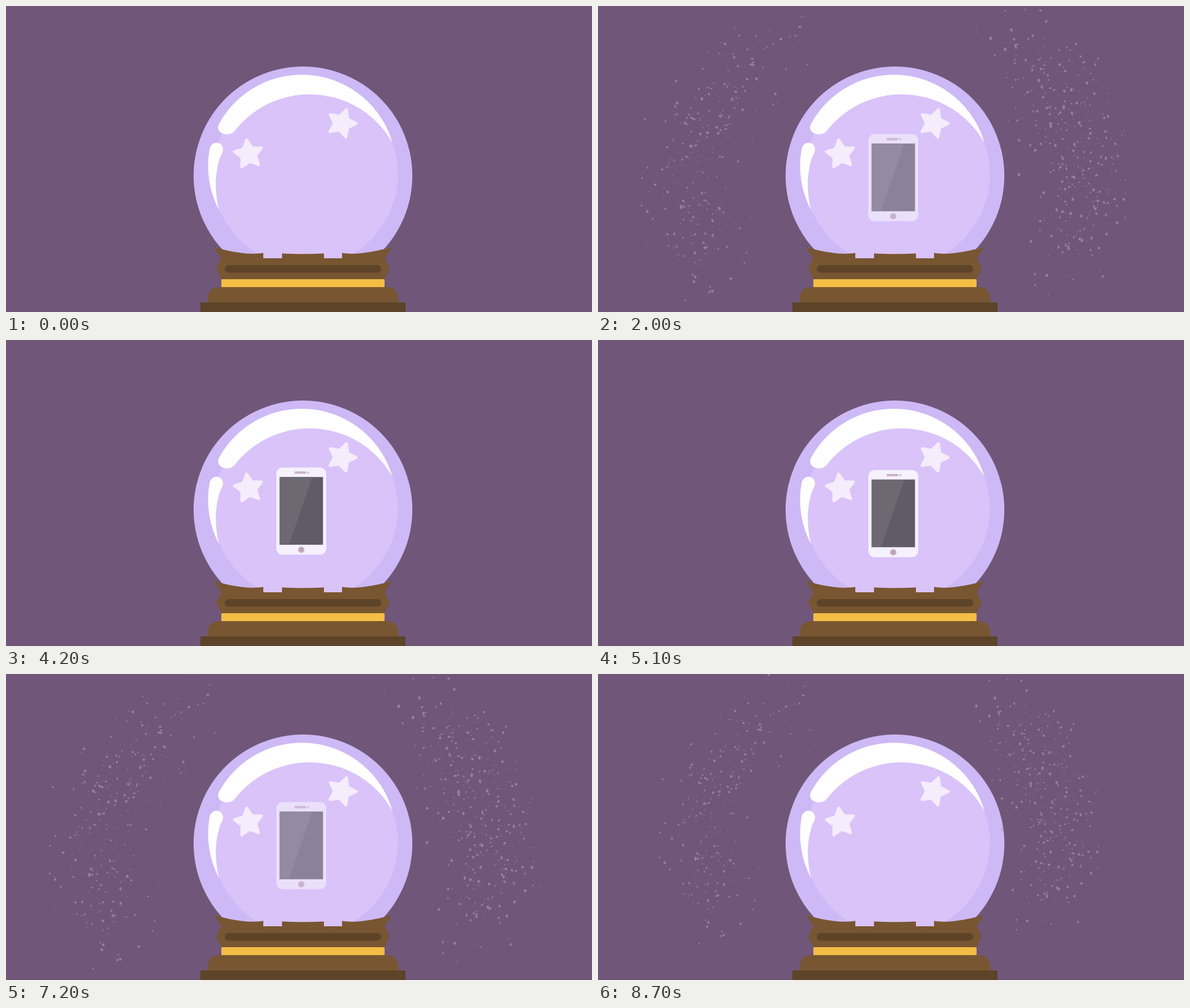
Animation of 1034 by 541 pixels, one loop 9200 ms. Source, as an HTML page:

```html
<!DOCTYPE html>
<html lang="en">
<head>
<meta charset="utf-8">
<title>Crystal ball</title>
<style>
  html, body { margin: 0; width: 100%; height: 100%; overflow: hidden; background: #705779; }
  svg { display: block; width: 100%; height: 100%; }
</style>
</head>
<body>
<svg viewBox="0 0 1034 541" preserveAspectRatio="none">
  <rect width="1034" height="541" fill="#705779"/>
  <rect y="540" width="1034" height="1" fill="#6a5273"/>

  <circle cx="524" cy="300" r="193" fill="#cdb9f5"/>
  <circle cx="528" cy="298" r="163.500" fill="#d9c3f9"/>
  <g fill="#fff">
    <path d="M682 242A166.500 166.500 0 0 0 376 208C370 220 380 227 390 227C398 227 402 223 405 219A167.500 167.500 0 0 1 682 242Z"/>
    <path d="M376 361A168 168 0 0 1 359 254C361 237.500 383 238 383 254C383 258 380 262 378 267C368 295 368 330 376 361Z"/>
  </g>
  <g id="stars" fill="#f5ecfc" stroke="#f5ecfc" stroke-width="5" stroke-linejoin="round"></g>

  <g id="phone">
    <rect x="477" width="88" height="154" rx="11" fill="#f5f1fd"/>
    <rect x="482.500" y="16.500" width="77" height="120" fill="#8d8598"/>
    <rect x="483" y="17" width="76" height="119" fill="#605b66"/>
    <path d="M483 17H540.500L499.500 136H483Z" fill="#6c6973"/>
    <rect x="509" y="6.700" width="21" height="4.200" rx="2.100" fill="#cbb3c8"/>
    <circle cx="533.300" cy="8.800" r="1.700" fill="#cbb3c8"/>
    <circle cx="521" cy="145.300" r="5.700" fill="#cbb3c6"/>
    <rect x="518.500" y="143.300" width="5" height="4" rx="1.300" fill="none" stroke="#937b98" stroke-width=".8"/>
  </g>

  <path d="M454 430H487V447H454ZM561 430H593V447H561Z" fill="#d9c3f9"/>
  <g fill="#785631">
    <path d="M367 426.500C396 434 426 441 454 436.500V446H487V437.500Q524 439.500 561 437.500V446H593V436.500C619 441 650 434 681 426.500L668 446L677 464L668 483H380L371 464L380 446Z"/>
    <path d="M356 524V516Q358 497 377 497H671Q690 497 692 516V524Z"/>
  </g>
  <rect x="386" y="458" width="276" height="13.500" rx="6.500" fill="#5d4428"/>
  <rect x="380" y="483" width="288" height="14" rx="1.500" fill="#f4bd46"/>
  <rect x="343" y="524" width="362" height="20" rx="2" fill="#5d4428"/>

  <g id="dust" opacity=".6"></g>
</svg>
<script>
const LOOP = 9200, FLOAT_START = 3500, FLOAT_END = 6000, REST_Y = 226.5;
const byId = id => document.getElementById(id);
const phone = byId('phone');

function addPath(parent, d) {
  const path = document.createElementNS('http://www.w3.org/2000/svg', 'path');
  path.setAttribute('d', d);
  return parent.appendChild(path);
}

function star(cx, cy, turn) {
  const points = Array.from({ length: 10 }, (_, i) => {
    const angle = (turn + i * 36) * Math.PI / 180, r = i % 2 ? 13 : 25.5;
    return `${cx + r * Math.cos(angle)} ${cy + r * Math.sin(angle)}`;
  });
  addPath(byId('stars'), `M${points.join('L')}Z`);
}
star(428, 262, -98);
star(592.5, 207.3, 1);

let seed = 71;
const random = () => (seed = (seed * 16807) % 2147483647) / 2147483647;
const scatter = width => (random() + random() + random() - 1.5) * width;

// Specks strewn around a quadratic curve through the given control points.
function trail(count, width, [x0, y0], [x1, y1], [x2, y2]) {
  const along = (a, b, c, u) => (1 - u) ** 2 * a + 2 * u * (1 - u) * b + u * u * c;
  let d = '';
  for (let i = 0; i < count; i++) {
    const u = random(), rx = 0.6 + 1.9 * random() ** 2, ry = rx * (0.65 + 0.35 * random());
    const x = along(x0, x1, x2, u) + scatter(width);
    const y = along(y0, y1, y2, u) + scatter(width);
    const half = `a${rx} ${ry} ${random() * 180} 1 0 `;
    d += `M${x - rx} ${y}${half}${2 * rx} 0${half}${-2 * rx} 0`;
  }
  return d;
}

function makeDust(color, ...trails) {
  const path = addPath(byId('dust'), trails.join(''));
  path.setAttribute('fill', color);
  return path;
}

const dust = {
  wide: makeDust('#a89fb8',
    trail(330, 78, [330, 75], [80, 190], [200, 460]),
    trail(440, 84, [740, 70], [900, 200], [840, 450])),
  slanted: makeDust('#b49cb4',
    trail(260, 72, [325, 75], [220, 100], [160, 205]),
    trail(320, 80, [885, 240], [830, 330], [805, 430])),
  scattered: makeDust('#aea0b6',
    trail(280, 72, [290, 90], [130, 230], [215, 400]),
    trail(320, 72, [770, 100], [900, 270], [810, 410]))
};

// Half-second scenes; they run again in reverse order after the phone floats.
const scenes = [
  { alpha: 0 },
  { alpha: 0, dust: 'wide', transform: 'translate(39 4.5) scale(.907)' },
  { alpha: 0, dust: 'slanted', transform: 'translate(1 0)' },
  { alpha: 0.3, dust: 'scattered', transform: 'translate(26 14) scale(.95)' },
  { alpha: 0.63, dust: 'wide', transform: '' },
  { alpha: 0.8, dust: 'scattered', transform: '' },
  { alpha: 1, dust: 'slanted', transform: '' }
];
const floating = { alpha: 1 };

function sceneAt(t) {
  if (t < FLOAT_START) return scenes[Math.floor(t / 500)];
  if (t < 6200) return floating;
  return scenes[Math.max(0, 6 - Math.floor((t - 6200) / 500))];
}

function phoneY(t) {
  const step = Math.floor(t / 100) * 100;
  if (step < FLOAT_START || step >= FLOAT_END) return REST_Y;
  const swing = 222.5 + 7.5 * Math.cos(2 * Math.PI * (step - 5100) / 1100);
  const strength = Math.min(1, (step - FLOAT_START) / 500);
  return REST_Y + (swing - REST_Y) * strength;
}

function draw(now) {
  const t = now % LOOP, scene = sceneAt(t);
  phone.setAttribute('opacity', scene.alpha);
  phone.setAttribute('transform', `translate(0 ${phoneY(t)})`);
  for (const name in dust) {
    const shown = name === scene.dust;
    dust[name].setAttribute('visibility', shown ? 'visible' : 'hidden');
    if (shown) dust[name].setAttribute('transform', scene.transform);
  }
}

const start = performance.now();
function tick() {
  draw(performance.now() - start);
  requestAnimationFrame(tick);
}
tick();
</script>
</body>
</html>
```
